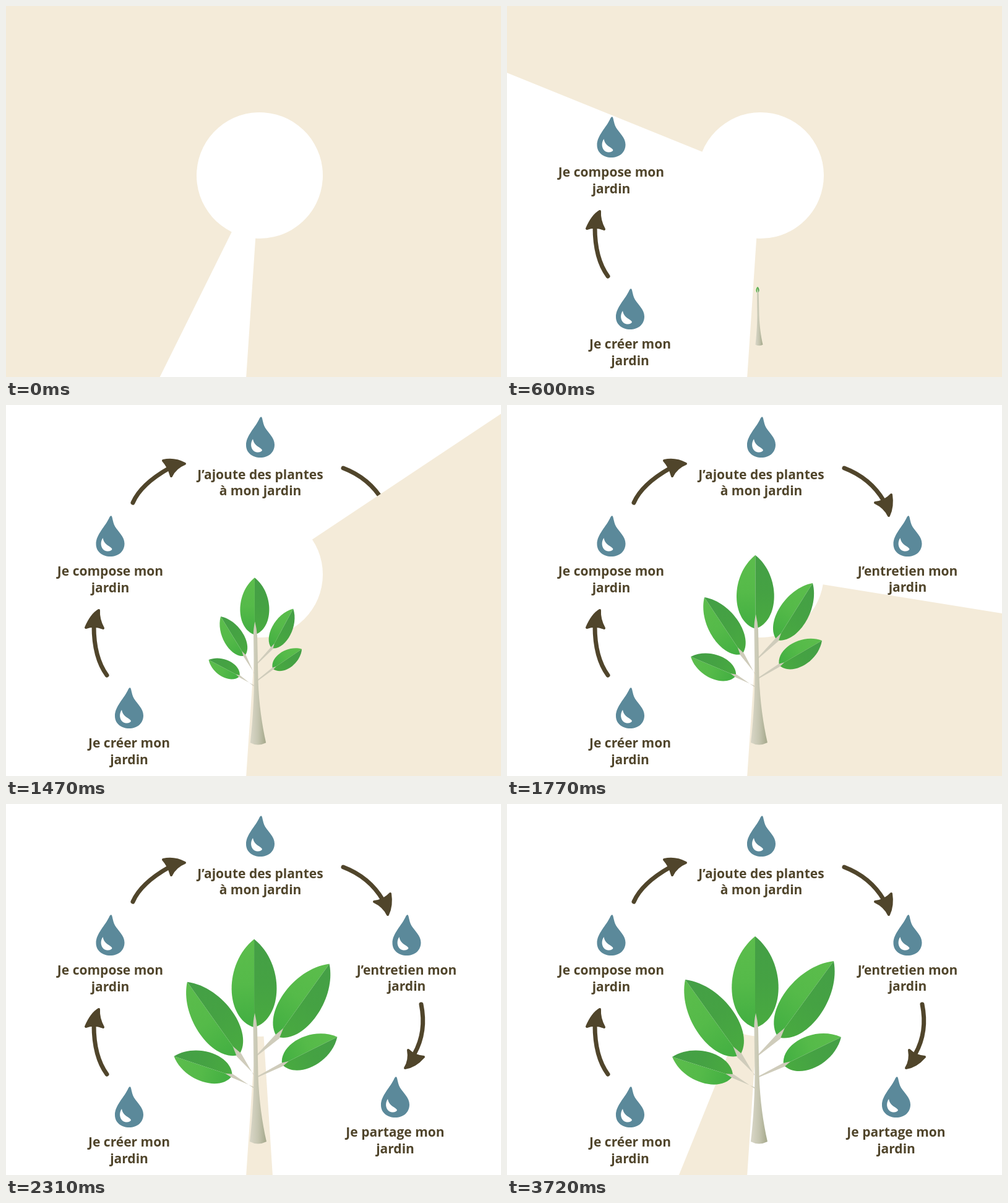
An HTML page with a canvas that plays this animation: 800 px wide and 600 px high, repeating every 5.16 s.

```html
<!DOCTYPE html>
<html lang="fr">
<head>
<meta charset="utf-8">
<title>Mon jardin</title>
<style>
html, body { margin: 0; width: 100%; height: 100%; overflow: hidden; background: #fff; }
canvas { display: block; }
</style>
</head>
<body>
<canvas id="stage" width="800" height="600"></canvas>
<script>
const ctx = document.getElementById('stage').getContext('2d');
const LOOP = 5160, STEP = 30;
const BROWN = '#50452b', BLUE = '#5b899a', BEIGE = '#f4ebd9', STEM = '#cfccbb';
const rad = deg => deg * Math.PI / 180;

// x centre, top of drop, first baseline, two lines
const steps = [
  [199, 457, 554, 'Je créer mon', 'jardin'],
  [168.5, 179, 276, 'Je compose mon', 'jardin'],
  [411, 19, 119.5, 'J’ajoute des plantes', 'à mon jardin'],
  [647.5, 179, 275.5, 'J’entretien mon', 'jardin'],
  [629, 441, 538, 'Je partage mon', 'jardin']
];
const drop = new Path2D('M1 0C4 0 3 9 8 18C13 26 23 34 23 45C23 58 13 66 0 66C-13 66-23 58-23 46C-23 30-8 18-1 2Z');
const shine = new Path2D('M-12 36C-16 42-16 50-11 55C-6 59 2 58 3 54C1 49-10 48-12 36Z');

// shaft and head of each arrow
const arrows = [
  ['M163 437Q142 408 142 358', 'M150 332Q138 339 129 360Q143 355 157 361Q149 346 150 332Z'],
  ['M205 158Q218 128 264 102', 'M289 95Q272 86 254 90Q263 100 267 115Q274 101 289 95Z'],
  ['M545 102Q587 118 609 155', 'M617 179Q610 165 595 158Q611 156 621 145Q624 164 617 179Z'],
  ['M671 324Q680 368 660 404', 'M645 427Q653 415 650 398Q660 408 675 409Q661 425 645 427Z']
].map(pair => pair.map(d => new Path2D(d)));

// half leaves, from base (0,0) to tip (1,0)
const lightHalf = new Path2D('M0 0C.1-.34.72-.36 1 0Z');
const darkHalf = new Path2D('M0 0C.1 .34.72 .36 1 0Z');
const trunk = new Path2D('M402 338Q399 352 399.5 363L400.5 440C400 485 397 520 394 546Q407 553 421 546C414 515 409 480 407.5 440L406 363Q405 350 402 338Z');

// poses at three growths: pivot, base, tip
const sides = [
  [.44, [403, 441, 397, 418, 386, 394], [401, 435, 380, 403, 319, 311], [400, 438, 376, 407, 288, 284]],
  [.44, [405, 440, 414, 427, 424, 402], [405, 410, 436, 380, 494, 288], [405, 407, 438, 377, 528, 254]],
  [.49, [402, 456, 392, 443, 375, 429], [400, 455, 370, 438, 297, 407], [400, 459, 365, 440, 267, 409]],
  [.5, [406, 456, 415, 443, 431, 428], [406, 442, 440, 421, 509, 381], [407, 441, 447, 422, 540, 377]]
];
const crown = [[405, 464, 405, 454], [403, 400, 403, 344], [401, 362, 401, 214]];
const crownKeys = [[15, 0], [20, .065], [37, .385], [59, .81], [77, .966], [88, 1]];
const sideKeys = [[29, 0], [37, .18], [59, .73], [77, .957], [88, 1]];

// smooth curve through keys
function track(keys, x) {
  const last = keys.length - 1;
  if (x <= keys[0][0]) return keys[0][1];
  if (x >= keys[last][0]) return keys[last][1];
  const k = keys.findIndex(key => key[0] > x) - 1;
  const slope = n => n < 1 || n >= last ? 0
    : (keys[n + 1][1] - keys[n - 1][1]) / (keys[n + 1][0] - keys[n - 1][0]);
  const [x0, a] = keys[k], [x1, b] = keys[k + 1];
  const w = x1 - x0, u = (x - x0) / w, v = 1 - u;
  return a * v * v * (1 + 2 * u) + b * u * u * (3 - 2 * u)
    + w * u * v * (slope(k) * v - slope(k + 1) * u);
}

// parabola through three poses reached at growths p, q, r
function blend(poses, [p, q, r], g) {
  const [A, B, C] = poses;
  return A.map((a, n) =>
    a * (g - q) * (g - r) / ((p - q) * (p - r)) +
    B[n] * (g - p) * (g - r) / ((q - p) * (q - r)) +
    C[n] * (g - p) * (g - q) / ((r - p) * (r - q)));
}

function shade(x0, x1, ...colours) {
  const grad = ctx.createLinearGradient(x0, 0, x1, 0);
  colours.forEach((c, n) => grad.addColorStop(n / (colours.length - 1), c));
  return grad;
}

function drawLeaf(bx, by, tx, ty, width) {
  const len = Math.hypot(tx - bx, ty - by);
  ctx.save();
  ctx.translate(bx, by);
  ctx.rotate(Math.atan2(ty - by, tx - bx));
  ctx.scale(len, len * width / .525);
  ctx.fillStyle = shade(0, 1, '#41ae41', '#55ba49', '#5cbd4c');
  ctx.fill(lightHalf);
  ctx.fillStyle = shade(0, 1, '#49ab40', '#45a243', '#449f46');
  ctx.fill(darkHalf);
  ctx.restore();
}

function drawBranch(px, py, bx, by, tx, ty) {
  const dx = tx - bx, dy = ty - by;
  ctx.fillStyle = STEM;
  ctx.beginPath();
  ctx.moveTo(px, py - 1);
  ctx.lineTo(bx + dy * .03, by - dx * .03);
  ctx.lineTo(bx + dx * .12, by + dy * .12);
  ctx.lineTo(bx - dy * .03, by + dx * .03);
  ctx.lineTo(px, py + 1);
  ctx.fill();
}

function drawTree(i) {
  const grown = Math.sin(rad(90 * Math.min(1, Math.max(0, (i - 2.6) / 59.3))));
  const top = track(crownKeys, i), side = track(sideKeys, i);
  if (top > 0) drawLeaf(...blend(crown, [.065, .385, 1], top), .51);
  if (side > 0) {
    for (const [width, ...poses] of sides) {
      const pose = blend(poses, [.18, .73, 1], side);
      drawLeaf(...pose.slice(2), width);
      drawBranch(...pose);
    }
  }
  if (grown > 0) {
    ctx.save();
    ctx.translate(407.5, 549);
    ctx.scale(grown, grown);
    ctx.translate(-407.5, -549);
    ctx.fillStyle = shade(396, 419, '#d6d4c4', '#c5c5b0', '#a9ac90');
    ctx.fill(trunk);
    ctx.restore();
  }
}

function drawScene() {
  ctx.fillStyle = '#fff';
  ctx.fillRect(0, 0, 800, 600);
  ctx.font = 'bold 21px "Open Sans", "Noto Sans", sans-serif';
  ctx.textAlign = 'center';
  for (const [x, y, base, first, second] of steps) {
    ctx.save();
    ctx.translate(x, y);
    ctx.fillStyle = BLUE;
    ctx.fill(drop);
    ctx.fillStyle = '#fff';
    ctx.fill(shine);
    ctx.restore();
    ctx.fillStyle = BROWN;
    ctx.fillText(first, x, base);
    ctx.fillText(second, x, base + 26.5);
  }
  ctx.strokeStyle = BROWN;
  ctx.lineCap = ctx.lineJoin = 'round';
  for (const [shaft, head] of arrows) {
    ctx.lineWidth = 7;
    ctx.stroke(shaft);
    ctx.lineWidth = 4;
    ctx.stroke(head);
    ctx.fill(head);
  }
}

// beige ring sector; angles run clockwise from straight down
function drawCover(i) {
  const edge = 22.05 + Math.min(i + 1, 84) * 360 / 84, fixed = 363.83;
  const from = rad(Math.min(edge, fixed) + 90), to = rad(Math.max(edge, fixed) + 90);
  ctx.fillStyle = BEIGE;
  ctx.beginPath();
  ctx.arc(410, 274, 102, from, to);
  ctx.arc(410, 274, 800, to, from, true);
  ctx.fill();
}

function render(now) {
  const i = Math.floor(now % LOOP / STEP);
  drawScene();
  drawCover(i);
  drawTree(i);
  requestAnimationFrame(render);
}
requestAnimationFrame(render);
</script>
</body>
</html>
```
